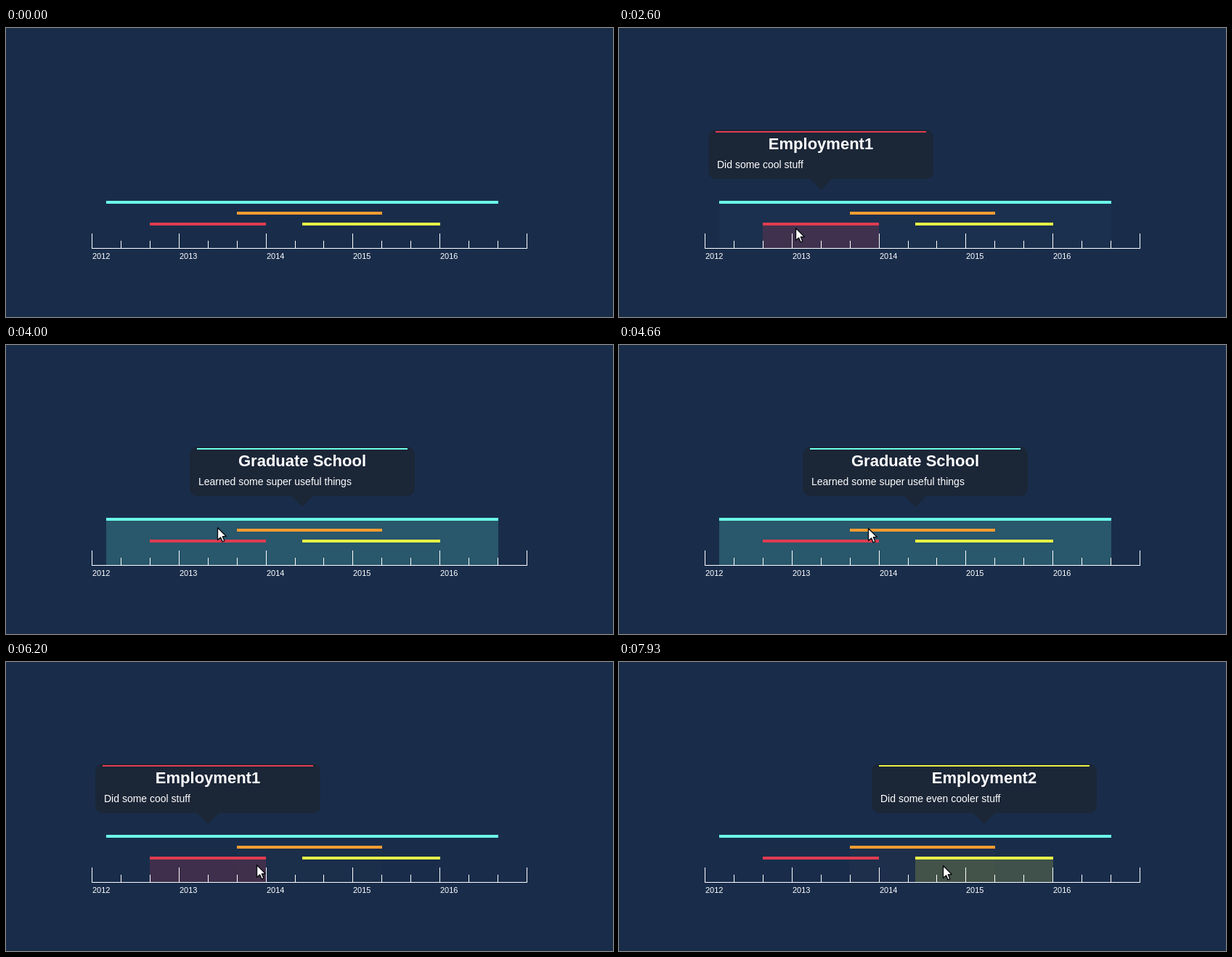
Write an HTML page with a canvas that moves like this. It is 836 px wide and 398 px high and loops after 8000 ms.

```html
<!DOCTYPE html>
<html lang="en">
<head>
<meta charset="utf-8">
<title>Timeline</title>
<style>
html, body { margin: 0; width: 100%; height: 100%; overflow: hidden; background: #192d4b; }
canvas { display: block; width: 836px; height: 398px; }
</style>
</head>
<body>
<canvas id="stage" width="836" height="398"></canvas>
<script>
const ctx = document.getElementById('stage').getContext('2d');
const LOOP = 8000, FILL_MS = 500, SHOW_MS = 300, HIDE_MS = 140;
const LEFT = 118, AXIS_Y = 303, TICK = 39.93, BOX_W = 310, BOX_BOTTOM = 208;
const FONT = '"Liberation Sans", Arial, sans-serif';
const ARROW = new Path2D('M0 0V17L4 13.4 6.6 19.4 9.4 18.2 6.8 12.3 11.8 12Z');

// Ten pixels per month, one row every 15 pixels.
const item = (row, month, months, color, title, ...lines) =>
  ({ x: LEFT + month * 10, y: 238 + row * 15, w: months * 10, color, title, lines });

const items = [
  item(0, 2, 54, '#6bffe9', 'Graduate School', 'Learned some super useful things'),
  item(1, 20, 20, '#f59c32', 'Contract Work',
    'Vivamus luctus, ipsum et pharetra auctor,',
    'diam quam lacinia odio, eu rutrum odio metus',
    'eget orci. Donec aliquam faucibus neque.'),
  item(2, 8, 16, '#e03c50', 'Employment1', 'Did some cool stuff'),
  item(2, 29, 19, '#e6f046', 'Employment2', 'Did some even cooler stuff')
];

// Pointer moves: from, until, x, y; it rests in between.
const ENTER = { t: 600, x: 3, y: 284 };
const moves = [
  [ENTER.t, 1100, 176, 264], [2070, 2600, 243, 275], [3330, 4000, 291, 251],
  [4000, 4600, 340, 251], [4600, 5330, 375, 258], [5330, 6400, 338, 284],
  [6700, 7060, 380, 278], [7400, 7930, 446, 280]
];

const clamp = v => Math.min(1, Math.max(0, v));

// cubic-bezier(.25, .1, .25, 1)
function ease(v) {
  const x = clamp(v);
  if (x === 0 || x === 1) return x;
  let lo = 0, hi = 1;
  for (let i = 0; i < 24; i++) {
    const s = (lo + hi) / 2, r = 1 - s;
    if (0.75 * r * s + s * s * s < x) lo = s; else hi = s;
  }
  const r = 1 - lo;
  return 0.3 * r * r * lo + 3 * r * lo * lo + lo ** 3;
}

function pointerAt(t) {
  let { x, y } = ENTER;
  for (const [from, until, toX, toY] of moves) {
    const k = clamp((t - from) / (until - from));
    x += (toX - x) * k;
    y += (toY - y) * k;
  }
  return { x, y };
}

// The topmost item whose area, from bar to axis, holds the pointer.
function itemAt({ x, y }) {
  return items.findLast(i => x >= i.x && x < i.x + i.w && y >= i.y && y < AXIS_Y);
}

function findHovers() {
  const list = [];
  let last;
  for (let t = ENTER.t; t < LOOP; t += 5) {
    const hit = itemAt(pointerAt(t));
    if (hit === last) continue;
    if (last) list[list.length - 1].end = t;
    if (hit) list.push({ item: hit, start: t, end: LOOP });
    last = hit;
  }
  return list;
}
const hovers = findHovers();

// Level of a hover that rises over inMs and falls over outMs.
const level = (h, t, inMs, outMs) =>
  ease((t - h.start) / inMs) * (1 - ease((t - h.end) / outMs));

function rect(x, y, w, h, color) {
  ctx.fillStyle = color;
  ctx.fillRect(x, y, w, h);
}

function text(str, x, y, font, align = 'left') {
  ctx.font = font + ' ' + FONT;
  ctx.textAlign = align;
  ctx.fillStyle = '#fff';
  ctx.fillText(str, x, y);
}

function drawFill({ x, y, w, color }, alpha) {
  ctx.globalAlpha = 0.2 * alpha;
  rect(x, y + 4, w, AXIS_Y - y - 4, color);
  ctx.globalAlpha = 1;
}

function drawAxis() {
  rect(LEFT, AXIS_Y, 600, 1, '#fff');
  for (let i = 0; i <= 15; i++) {
    const x = LEFT + i * TICK, h = i % 3 ? 10 : 20;
    rect(Math.round(x), AXIS_Y - h, 1, h, '#fff');
    if (i % 3 === 0 && i < 15) text(2012 + i / 3, Math.round(x + 1), 318, '11px');
  }
}

function drawBubble({ x, w, color, title, lines }, p) {
  const cx = x + w / 2, left = cx - BOX_W / 2;
  const top = 156 - 16 * lines.length, scale = 0.9 + 0.1 * p;
  ctx.save();
  ctx.globalAlpha = Math.sqrt(p);
  ctx.translate(cx, BOX_BOTTOM);
  ctx.scale(scale, scale);
  ctx.translate(-cx, -BOX_BOTTOM);
  ctx.fillStyle = '#1b2637';
  ctx.beginPath();
  ctx.roundRect(left, top, BOX_W, BOX_BOTTOM - top, 10);
  ctx.moveTo(cx - 15, BOX_BOTTOM);
  ctx.lineTo(cx + 15, BOX_BOTTOM);
  ctx.lineTo(cx, BOX_BOTTOM + 15);
  ctx.fill();
  rect(left + 10, top + 2, BOX_W - 20, 2, color);
  text(title, cx, top + 27, 'bold 22px', 'center');
  lines.forEach((line, i) => text(line, left + 12, top + 53 + i * 16, '14px'));
  ctx.restore();
}

function drawPointer(t) {
  if (t < ENTER.t) return;
  const { x, y } = pointerAt(t);
  ctx.save();
  ctx.translate(Math.round(x) + 0.5, Math.round(y) + 0.5);
  ctx.fillStyle = '#fff';
  ctx.strokeStyle = '#0b0d12';
  ctx.lineWidth = 1.4;
  ctx.lineJoin = 'round';
  ctx.fill(ARROW);
  ctx.stroke(ARROW);
  ctx.restore();
}

function draw(t) {
  rect(0, 0, 836, 398, '#192d4b');
  for (const h of hovers) drawFill(h.item, level(h, t, FILL_MS, FILL_MS));
  for (const i of items) rect(i.x, i.y, i.w, 4, i.color);
  drawAxis();
  for (const h of hovers) {
    const p = level(h, t, SHOW_MS, HIDE_MS);
    if (p > 0) drawBubble(h.item, p);
  }
  drawPointer(t);
}

const begin = performance.now();
function tick() {
  draw((performance.now() - begin) % LOOP);
  requestAnimationFrame(tick);
}
tick();
</script>
</body>
</html>
```
